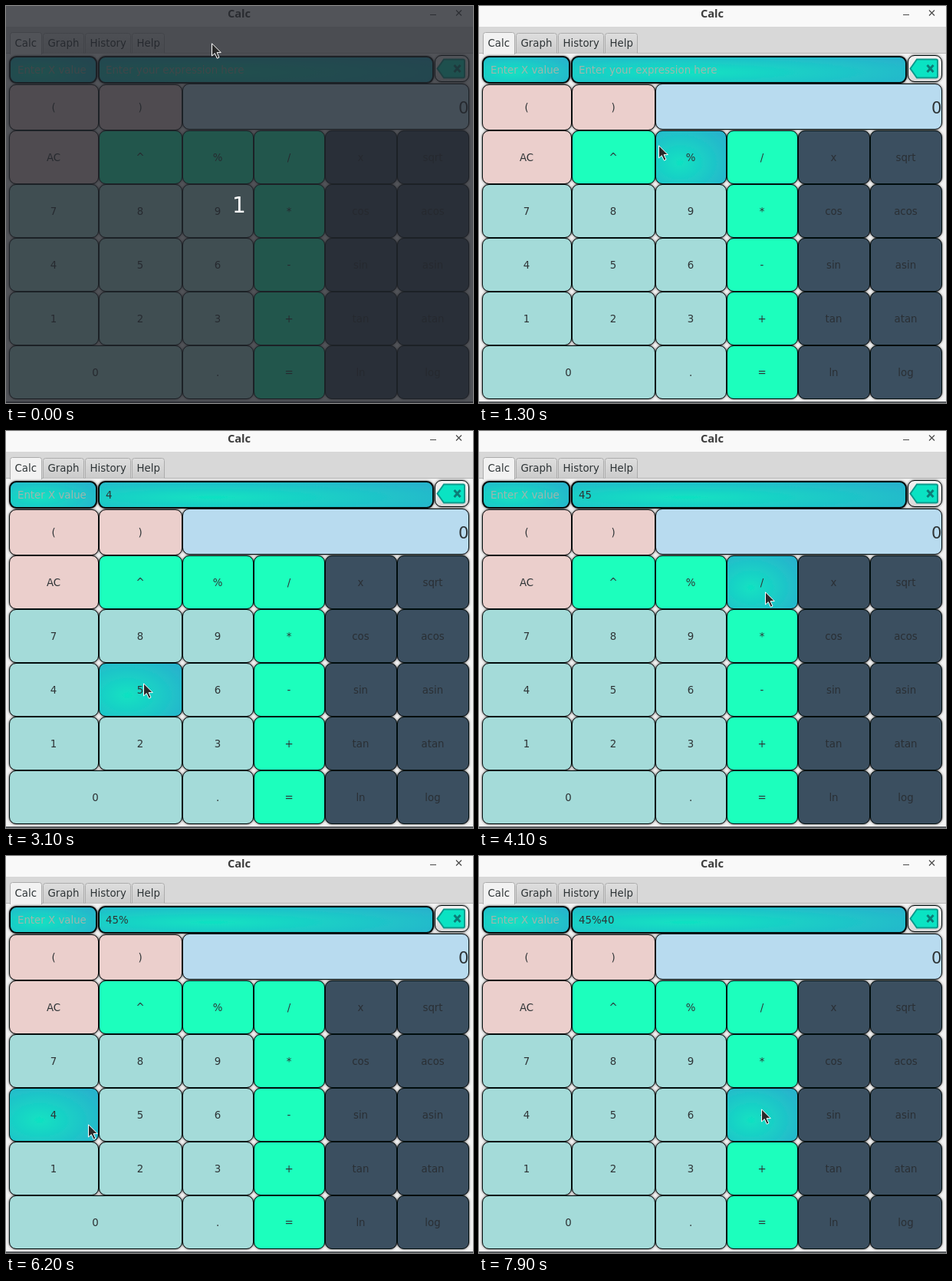
An HTML page for the animation above (8 s loop, 609 by 517 pixels).

```html
<!DOCTYPE html>
<html>
<head>
<meta charset="utf-8">
<title>Calc</title>
<style>
html, body { margin: 0; width: 100%; height: 100%; overflow: hidden; background: #ececec; }
svg { display: block; width: 609px; height: 517px; }
text { font: 13.33px "DejaVu Sans", sans-serif; fill: #2e3436; }
.mid { text-anchor: middle; }
.title { font: bold 14.67px "Noto Sans", sans-serif; fill: #3d3d3d; }
.hint { fill: #a0b6ae; }
.dim { fill: #2a2f34; }
.result { font-size: 21.3px; text-anchor: end; }
.count { font-size: 28px; fill: #fff; }
</style>
</head>
<body>
<svg viewBox="0 0 609 517" xmlns="http://www.w3.org/2000/svg">
  <defs>
    <radialGradient id="glow" cx=".34" cy=".6" r=".78">
      <stop offset="0" stop-color="#10e2c2"/>
      <stop offset="1" stop-color="#27b4cc"/>
    </radialGradient>
    <linearGradient id="tab" x2="0" y2="1">
      <stop offset="0" stop-color="#dedede"/>
      <stop offset="1" stop-color="#cbcbcb"/>
    </linearGradient>
    <linearGradient id="raised" x2="0" y2="1">
      <stop offset="0" stop-color="#f4f4f4"/>
      <stop offset="1" stop-color="#d8d8d8"/>
    </linearGradient>
    <filter id="shade" x="-5%" y="-5%" width="110%" height="110%">
      <feDropShadow dx="0" dy="0" stdDeviation="1.5" flood-color="#000" flood-opacity=".7"/>
    </filter>
  </defs>
  <rect width="609" height="517" fill="#f2f2f2"/>
  <rect width="609" height="27" fill="#f9f9f9"/>
  <rect y="27" width="609" height="35" fill="#d8d8d8"/>
  <path d="M0 61.5H609" stroke="#b4b4b4"/>
  <text class="mid title" x="304" y="15">Calc</text>
  <path d="M553 11.5h8M587 5.5l7 7m0-7l-7 7" stroke="#4a4a4a" stroke-width="1.2" fill="none"/>
  <g id="tabs"></g>
  <g id="boxes" filter="url(#shade)"></g>
  <g id="labels"></g>
  <path d="M562.5 81.5l8.5-12h25q2 0 2 2v20q0 2-2 2h-25z" fill="#0ae3c3" stroke="#0c9a8c" stroke-width="2"/>
  <path d="M584.5 77l8 9m0-9l-8 9" stroke="#0b7d78" stroke-width="3"/>
  <path d="M0 516H609" stroke="#22262b" stroke-width="1.6"/>
  <g id="intro">
    <rect width="609" height="517" fill="#24272e" fill-opacity=".78"/>
    <text class="mid count" x="304" y="269">1</text>
  </g>
  <path id="cursor" d="M.5 .8V17l3.8-3.4 3 6.6 2.7-1.2-2.9-6.4h5.2z" fill="#2a2a2a" stroke="#fff" stroke-linejoin="round"/>
</svg>
<script>
const $ = id => document.getElementById(id);
const LOOP = 8000, STEP = 100;

function add(parent, tag, attrs, text = "") {
  const el = document.createElementNS("http://www.w3.org/2000/svg", tag);
  for (const name in attrs) el.setAttribute(name, attrs[name]);
  el.textContent = text;
  return parent.appendChild(el);
}

const label = (text, x, y, style) => add($("labels"), "text", { class: style, x, y }, text);

// Rounded box whose border lies just inside the given bounds
function box(left, top, right, bottom, fill, border = 1) {
  const inset = border / 2;
  return add($("boxes"), "rect", {
    x: left + inset, y: top + inset, width: right - left - border, height: bottom - top - border,
    rx: 8.5, fill, stroke: "#050809", "stroke-width": border
  });
}

// Tabs, each as wide as its name
let tabLeft = 5;
for (const name of ["Calc", "Graph", "History", "Help"]) {
  const active = name === "Calc";
  const shape = add($("tabs"), "path", { fill: active ? "#f2f2f2" : "url(#tab)", stroke: "#acacac" });
  const text = add($("tabs"), "text", { x: tabLeft + 6.5, y: 53 }, name);
  const width = Math.round(text.getComputedTextLength()) + 12;
  const top = active ? 34.5 : 35.5, bottom = active ? 63 : 61.5;
  shape.setAttribute("d", `M${tabLeft + .5} ${bottom}V${top + 3}q0-3 3-3h${width - 6}q3 0 3 3V${bottom}`);
  tabLeft += width + 2;
}

// Entries, erase button and result
box(4, 65, 119, 101, "url(#glow)", 2);
box(120, 65, 558, 101, "url(#glow)", 2);
box(559, 64, 604, 99, "url(#raised)");
box(230, 101, 604, 161, "#b8dbef");
label("Enter X value", 15, 88, "hint");
label("0", 603.5, 139.5, "result");
const entry = label("", 130, 88, "hint");

// Keypad
const COLUMNS = [4, 121, 230, 323, 416, 510, 604];
const ROWS = ["( )", "AC ^ % / x sqrt", "7 8 9 * cos acos", "4 5 6 - sin asin", "1 2 3 + tan atan", "0  . = ln log"];
const PINK = "#ebcfcc", GREEN = "#1bffbd", PALE = "#a4dbd9", NAVY = "#3b4f61";

function keyColor(name) {
  if (/^[a-z]/.test(name)) return NAVY;
  if (/[()AC]/.test(name)) return PINK;
  return /[\d.]/.test(name) ? PALE : GREEN;
}

const keys = [];
ROWS.forEach((row, r) => row.split(" ").forEach((name, c) => {
  if (!name) return;
  const left = COLUMNS[c], right = COLUMNS[name === "0" ? c + 2 : c + 1];
  const bottom = 162 + 70 * r, top = r ? bottom - 70 : 102;
  const fill = keyColor(name);
  const shape = box(left, top, right, bottom, fill);
  label(name, (left + right - 1) / 2, (top + bottom) / 2 + 5, fill === NAVY ? "mid dim" : "mid");
  keys.push({ shape, fill, left, right, top, bottom });
}));

// Pointer moves in tenths of a second; it rests wherever one ends before the next begins
const MOVES = [
  { leave: 6, arrive: 10, to: [228, 21] },
  { leave: 11, arrive: 13, to: [234, 181] },
  { leave: 13, arrive: 17, to: [92, 357] },
  { leave: 19, arrive: 23, to: [150, 385] },
  { leave: 23, arrive: 28, to: [104, 340] },
  { leave: 29, arrive: 31, to: [179, 328] },
  { leave: 33, arrive: 37, to: [440, 260] },
  { leave: 37, arrive: 41, to: [373, 209] },
  { leave: 45, arrive: 47, to: [325, 199] },
  { leave: 49, arrive: 51, to: [298, 201] },
  { leave: 53, arrive: 57, to: [294, 199] },
  { leave: 57, arrive: 62, to: [107, 349] },
  { leave: 67, arrive: 70, to: [153, 437] },
  { leave: 70, arrive: 72, to: [157, 462] },
  { leave: 74, arrive: 79, to: [368, 329] }
];
const TYPED = "45%40", PRESSES = [29, 33, 54, 67, 73];

function pointerAt(tick) {
  let at = [268, 48];
  for (const { leave, arrive, to } of MOVES) {
    const k = Math.min(1, Math.max(0, (tick - leave) / (arrive - leave)));
    at = at.map((v, i) => v + (to[i] - v) * k);
  }
  return at.map(Math.round);
}

function draw(ms) {
  const tick = Math.floor(ms % LOOP / STEP);
  const [x, y] = pointerAt(tick);
  $("cursor").setAttribute("transform", `translate(${x} ${y})`);
  $("intro").setAttribute("visibility", tick ? "hidden" : "visible");
  for (const key of keys) {
    const hover = x >= key.left && x < key.right && y >= key.top && y < key.bottom;
    key.shape.setAttribute("fill", hover ? "url(#glow)" : key.fill);
  }
  const typed = TYPED.slice(0, PRESSES.filter(press => press <= tick).length);
  entry.textContent = typed || "Enter your expression here";
  entry.setAttribute("class", typed ? "" : "hint");
}

const start = performance.now();
function frame() {
  draw(performance.now() - start);
  requestAnimationFrame(frame);
}
frame();
</script>
</body>
</html>
```
